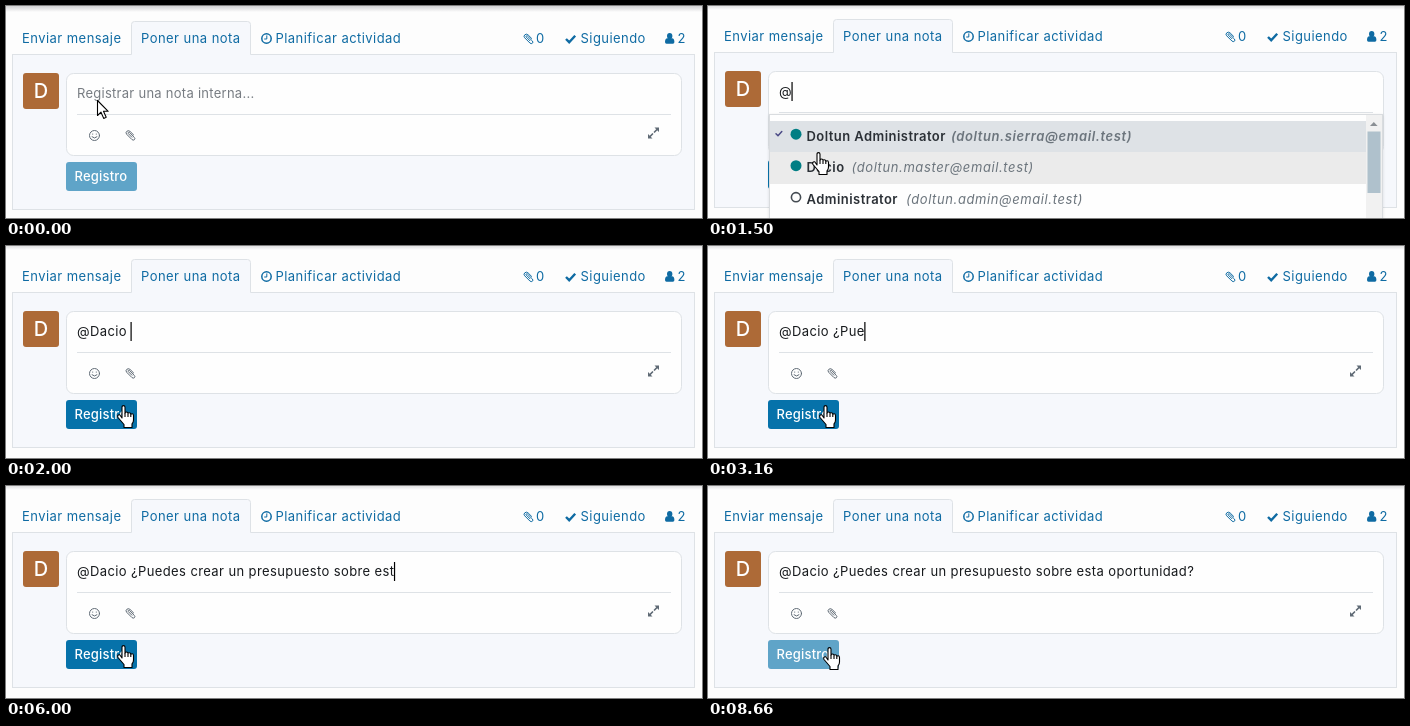
These frames come from a looping animation (696 px wide and 212 px high, 8830 ms). An HTML page:

```html
<!DOCTYPE html>
<html lang="es">
<head>
<meta charset="utf-8">
<title>Nota interna</title>
<style>
html, body { margin: 0; width: 100%; height: 100%; overflow: hidden; background: #fdfdfd; }
svg { display: block; width: 696px; height: 212px; font: 13px Inter, "Open Sans", sans-serif; letter-spacing: .45px; }
text { white-space: pre; }
.link { fill: #0f6ba3; }
.line { fill: none; stroke: #dee2e6; }
.icon { fill: none; stroke: #5f6a75; stroke-width: 1; stroke-linecap: round; stroke-linejoin: round; }
.blue { stroke: #0f6ba3; }
.name { font-weight: 600; fill: #2b3036; letter-spacing: .45px; }
.mail { font-style: italic; fill: #6c757d; letter-spacing: .6px; }
.pointer { fill: #fff; stroke: #000; stroke-width: 1.1; stroke-linejoin: round; }
</style>
</head>
<body>
<svg viewBox="0 0 696 212">
  <defs>
    <linearGradient id="shade" x1="0" y1="0" x2="0" y2="1">
      <stop offset="0" stop-color="#c9c9cc"/>
      <stop offset="1" stop-color="#fdfdfd"/>
    </linearGradient>
    <filter id="soft" x="-5%" y="-10%" width="110%" height="120%">
      <feDropShadow dx="0" dy="1" stdDeviation="1.5" flood-opacity=".12"/>
    </filter>
    <path id="clip" d="M3.6-.6L.2-4Q-1.6-5.6-3.2-4.2T-3.3-1.2L1.9 4Q3.3 5.2 4.4 4.2T4.3 1.9L-.6-3Q-1.3-3.5-1.8-3T-1.7-1.9L1.9 1.7"/>
  </defs>

  <g id="page">
    <rect x="0" y="-3" width="696" height="7" fill="url(#shade)"/>
    <rect x="6.5" y="46.5" width="682" height="155" fill="#f6f8fc" stroke="#dee2e6"/>
    <path d="M125.5 47V16.5q0-3 3-3H241.5q3 0 3 3V47" fill="#f6f8fc"/>
    <path class="line" d="M125.5 46.5V16.5q0-3 3-3H241.5q3 0 3 3V46.5"/>

    <g class="link">
      <text x="16" y="35">Enviar mensaje</text>
      <text x="135" y="35">Poner una nota</text>
      <text x="269.5" y="35">Planificar actividad</text>
      <text x="530" y="35">0</text>
      <text x="574.5" y="35">Siguiendo</text>
      <text x="671.5" y="35">2</text>
      <path d="M661 28a2.7 2.9 0 1 1 5.4 0a2.7 2.9 0 1 1-5.4 0M659 34q0-3.8 2.4-3.8q2.3 1.6 4.6 0q2.4 0 2.4 3.8q0 1.8-1.5 1.8h-6.4q-1.5 0-1.5-1.8"/>
    </g>
    <circle class="icon blue" cx="260.5" cy="30.5" r="4.7" style="stroke-width:1.5"/>
    <path class="icon blue" d="M260.8 27.8v3.2h-2.2"/>
    <use href="#clip" class="icon blue" x="522" y="31"/>
    <path class="icon blue" d="M560 31l3.2 3.2l6-6.4" style="stroke-width:2.4;stroke-linecap:butt;stroke-linejoin:miter"/>

    <rect x="17" y="65" width="36" height="36" rx="3" fill="#ad6a37"/>
    <text x="35" y="90" text-anchor="middle" font-size="20" font-weight="500" style="letter-spacing:0" fill="#fff">D</text>

    <rect x="60.5" y="65.5" width="615" height="82" rx="7" fill="#fefefe" stroke="#dee2e6"/>
    <path class="line" d="M71 106.5H665"/>
    <text id="hint" x="71" y="90" fill="#777c82" style="letter-spacing:.27px">Registrar una nota interna...</text>
    <text id="note" x="71" y="90" fill="#16191c" style="letter-spacing:.39px"></text>
    <rect id="caret" y="76" width="1.2" height="19" fill="#000"/>

    <circle class="icon" cx="88.5" cy="127.5" r="5"/>
    <path class="icon" d="M86.7 126v.2M90.3 126v.2M86 128.8q2.5 2.6 5 0"/>
    <use href="#clip" class="icon" x="124" y="127.5"/>
    <path class="icon" d="M643.5 129l3-3M648.5 124l3-3" style="stroke-width:1.7"/>
    <path d="M642 126v4.5h4.5zM653 124v-4.5h-4.5z" fill="#5f6a75"/>

    <rect id="button" x="60" y="154" width="71" height="29" rx="3"/>
    <text x="68.5" y="173" fill="#fff" font-weight="500" style="letter-spacing:.2px">Registro</text>

    <g id="menu">
      <rect x="61.5" y="108.5" width="613" height="120" fill="#fefefe" stroke="#d9dcdf" filter="url(#soft)"/>
      <rect x="62" y="115" width="596" height="31" fill="#dee2e6"/>
      <rect id="hover" x="62" y="146" width="596" height="32" fill="#ebebeb"/>
      <rect x="658" y="109" width="16" height="110" fill="#f1f1f1"/>
      <path d="M662 120l3.800-4l3.800 4z" fill="#8a8f94"/>
      <rect x="659.500" y="125.500" width="13" height="61.500" fill="#afc1cc"/>
      <path class="icon" d="M68 127.800l2 2l3.800-4.200" style="stroke:#4b4a86;stroke-width:1.500"/>
      <g id="people"></g>
    </g>
  </g>

  <path id="arrow" class="pointer" d="M.5.5V15.500l3.500-3.300l2.700 6.200l2.500-1.100l-2.700-6h4.700z"/>
  <path id="beam" fill="none" stroke="#000" stroke-width="1.200" d="M-3.500-7.500h2.500l1 1l1-1h2.500M0-6.500V6.500M-3.500 7.500h2.500l1-1l1 1h2.500"/>
  <g id="hand" class="pointer">
    <path d="M5 2.200Q5 .6 6.500 .6T8 2.200V8Q8 7 9.500 7T11 8.600Q11 7.800 12.300 7.800T13.800 9.600Q14 8.800 15.200 8.800T16.500 10.600V15Q16.500 17.500 15 19V22.500H7V19.500L1 12.500Q0 10.800 1.300 10T3.600 11L5 13Z"/>
    <path d="M8 8v4M11 9v3M13.800 10v2" fill="none"/>
  </g>
</svg>

<script>
const $ = id => document.getElementById(id);
const LOOP = 8830;
const MESSAGE = "@Dacio ¿Puedes crear un presupuesto sobre esta oportunidad?";

// name, address, x of the address, online, weight
const PEOPLE = [
  ["Doltun Administrator", "doltun.sierra@email.test", 243, true, 600],
  ["Dacio", "doltun.master@email.test", 143.5, true, 400],
  ["Administrator", "doltun.admin@email.test", 198, false, 400]
];
$("people").innerHTML = PEOPLE.map(([name, mail, x, online, weight], i) => {
  const y = 128.2 + i * 31.5;
  const base = Math.round(y + 6.5);
  const dot = online
    ? `<circle cx="88" cy="${y}" r="5.5" fill="#017e84"/>`
    : `<circle cx="88" cy="${y}" r="4.6" fill="none" stroke="#444b52" stroke-width="1.6"/>`;
  return `${dot}<text class="name" x="98.5" y="${base}">${name}</text>
    <text class="mail" x="${x}" y="${base}" font-weight="${weight}">(${mail})</text>`;
}).join("");

// Each row starts with the step from which it holds.
const POINTER = [
  [0, "arrow", 91, 94], [1, "beam", 93.5, 95.5], [8, "hand", 95, 120],
  [9, "hand", 104, 146], [10, "hand", 107.5, 156.5], [12, "hand", 111, 159],
  [47, "hand", 113, 160], [48, "hand", 115, 161]
];
const BUTTON = [[0, "#5fa4c8"], [3, "#0672aa"], [49, "#05618f"], [51, "#5fa4c8"]];
const CARET = [[0, 0], [1, 1], [15, 0], [17, 1], [48, 0]];
const TYPED = [[0, 0], [2, 0], [3, 1], [11, 1], [12, 7], [17, 7], [25, 23], [36, 45], [42, 56], [44, 59], [53, 59]];

const hold = (rows, k) => rows.filter(row => row[0] <= k).pop();

function typed(k) {
  const i = TYPED.findIndex(row => row[0] > k);
  const [a, n] = TYPED[i - 1], [b, m] = TYPED[i];
  return Math.round(n + (m - n) * (k - a) / (b - a));
}

const show = (id, on) => { $(id).style.display = on ? "" : "none"; };

function draw(k) {
  const count = typed(k);
  $("page").setAttribute("transform", `translate(0 ${k ? 0 : 2})`);
  $("note").textContent = MESSAGE.slice(0, count);
  show("hint", !count);
  $("caret").setAttribute("x", 71 + (count ? $("note").getComputedTextLength() - .5 : 0));
  show("caret", hold(CARET, k)[1]);
  $("button").setAttribute("fill", hold(BUTTON, k)[1]);
  show("menu", k >= 5 && k < 12);
  show("hover", k >= 9);

  const [, kind, x, y] = hold(POINTER, k);
  for (const id of ["arrow", "beam", "hand"]) show(id, id === kind);
  $(kind).setAttribute("transform", `translate(${x} ${y})`);
}

// Six steps per second, rounded down to whole hundredths.
const stepAt = ms => Math.ceil((Math.floor(ms / 10) + 1) * 3 / 50) - 1;

const start = performance.now();
let last = -1;
function tick() {
  const k = stepAt((performance.now() - start) % LOOP);
  if (k !== last) draw(last = k);
  requestAnimationFrame(tick);
}
tick();
</script>
</body>
</html>
```
